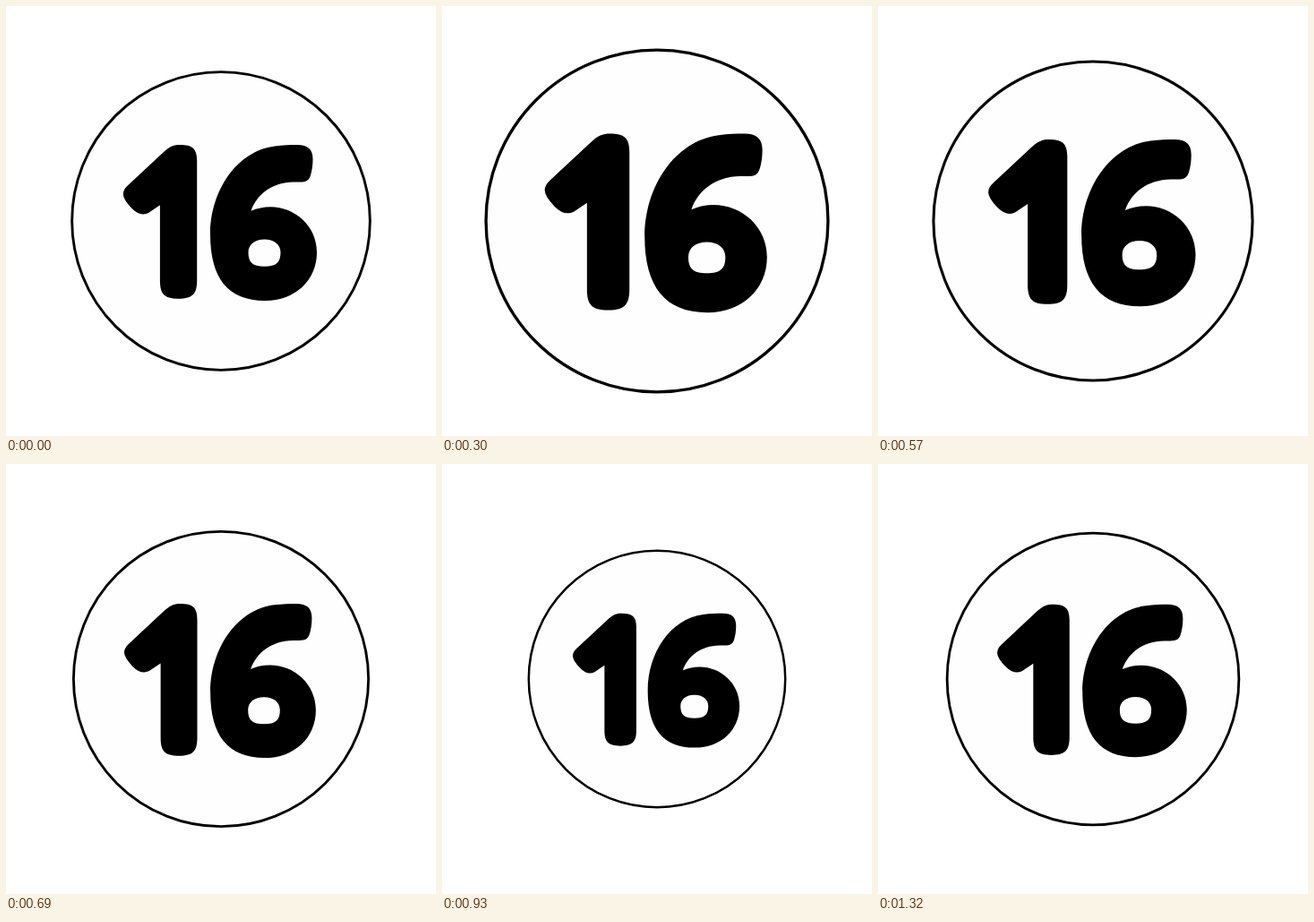
Animation, 480 px wide and 480 px high, one loop 1350 ms. Source, as an HTML page with a canvas:

```html
<!DOCTYPE html>
<html lang="en">
<head>
<meta charset="utf-8">
<title>Pulsing 16</title>
<style>
  html, body { margin: 0; width: 100%; height: 100%; overflow: hidden; background: #fff; }
  canvas { display: block; }
</style>
</head>
<body>
<canvas id="stage" width="480" height="480"></canvas>
<script>
const ctx = document.getElementById('stage').getContext('2d');
const LOOP = 1350, STEP = 30, CENTER = 240;
const RADIUS = 167.8, SWING = 0.15, LINE = 2.9;

const one = new Path2D(`M171.9 222.3 L159 231 Q150 235.5 140.5 226
  Q130.8 216 130.8 210 Q130.8 205 136 200.3 L176 163
  C183 156.5 188 155 194 155 C208 155 213.2 159 213.2 173
  L213.2 306 C213.2 321 209 326.7 192.5 326.7
  C176 326.7 171.9 321 171.9 306 Z`);

const six = new Path2D(`M300 156.5 C309 155.2 318 155 325 155
  C337 155 342.5 160 342.5 171 C342.5 178 341.5 184 340 189
  C338 195 335 196.5 328 196.5 L321 196.5
  C297 197 280 210 273.5 228.8 C280 225.8 288 224.3 295 224.3
  C323 224.3 347 246 347 275 C347 306 323 329 289 329
  C248 329 228 304 228 255 C228 207 257 162 300 156.5 Z
  M288.5 260.5 C278 260.5 270.5 266 270.5 275
  C270.5 286 275 290.7 288.5 290.7
  C302 290.7 306.5 286 306.5 275
  C306.5 266 299 260.5 288.5 260.5 Z`);

function draw(time) {
  const stepped = Math.floor((time % LOOP) / STEP) * STEP;
  const scale = 1 + SWING * Math.sin(2 * Math.PI * stepped / LOOP);

  ctx.setTransform(1, 0, 0, 1, 0, 0);
  ctx.fillStyle = '#fff';
  ctx.fillRect(0, 0, 480, 480);

  ctx.translate(CENTER, CENTER);
  ctx.scale(scale, scale);
  ctx.translate(-CENTER, -CENTER);

  ctx.beginPath();
  ctx.arc(CENTER, CENTER, RADIUS - LINE / 2, 0, 2 * Math.PI);
  ctx.fillStyle = '#fefefe';
  ctx.fill();
  ctx.lineWidth = LINE;
  ctx.strokeStyle = '#000';
  ctx.stroke();

  ctx.fillStyle = '#000';
  ctx.fill(one);
  ctx.fill(six, 'evenodd');
}

const start = performance.now();
function tick() {
  draw(performance.now() - start);
  requestAnimationFrame(tick);
}
tick();
</script>
</body>
</html>
```
